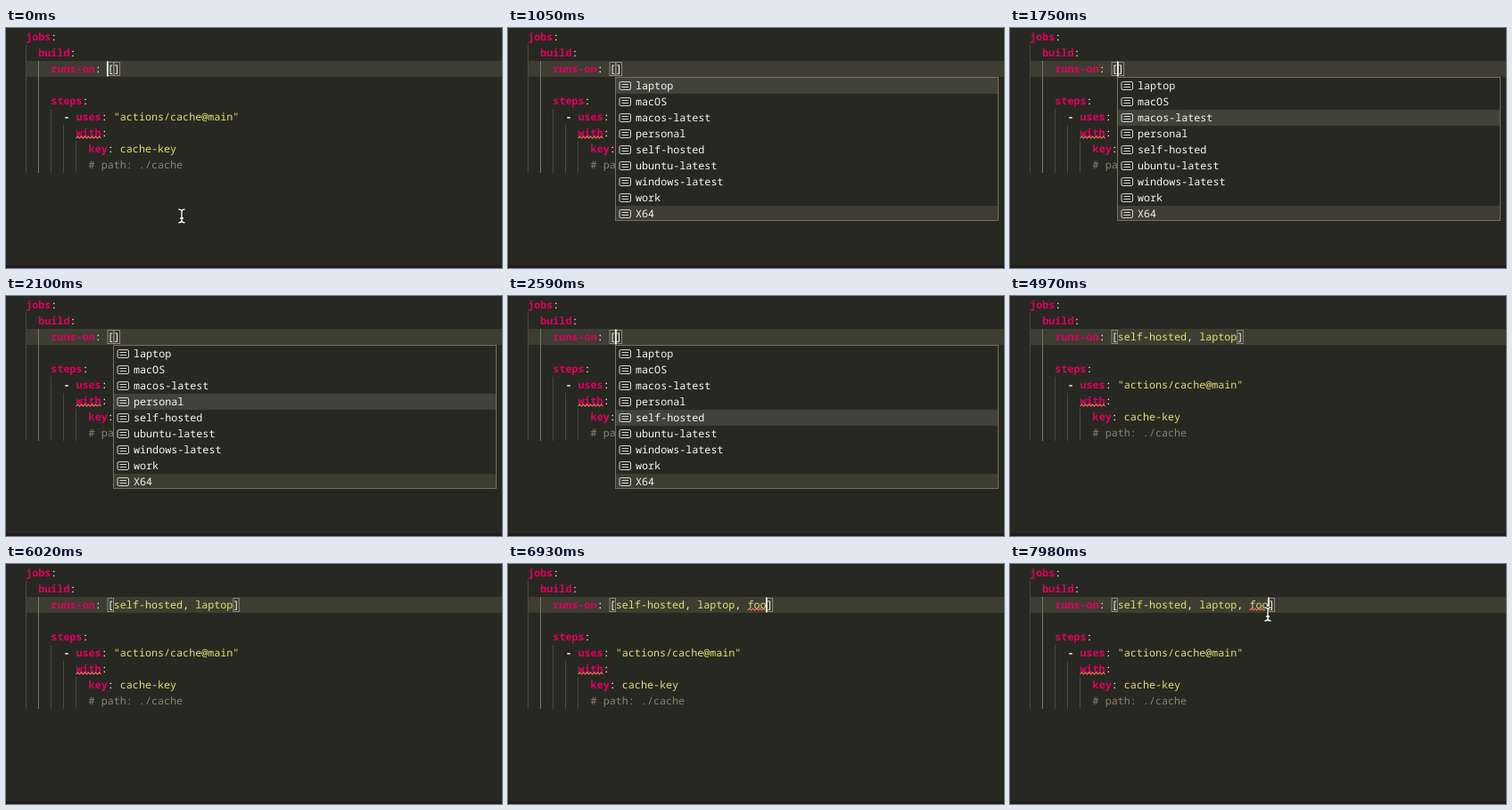
Write an HTML page that moves like this. It is 556 px wide and 270 px high and loops after 8 s.

```html
<!DOCTYPE html>
<html lang="en">
<head>
<meta charset="utf-8">
<title>Workflow runner completion</title>
<style>
html, body { margin: 0; width: 100%; height: 100%; overflow: hidden; background: #272822; }
svg { display: block; width: 100%; height: 100%; }
text {
  font: 500 11.73px "Noto Sans Mono", "DejaVu Sans Mono", monospace;
  text-rendering: geometricPrecision;
  white-space: pre;
  fill: #f8f8f2;
}
.key { fill: #e00060; font-weight: 700; }
.str { fill: #e8dc72; }
.note { fill: #88846f; }
.wave { fill: none; stroke: #f0705c; stroke-width: 1.1; }
.match { fill: none; stroke: #8a8a80; }
</style>
</head>
<body>
<svg id="stage" viewBox="0 0 556 270" preserveAspectRatio="xMinYMin meet"></svg>
<script>
const LOOP = 8000, CHAR = 7.04, LEFT = 22.2, ROW = 18;
const stage = document.getElementById('stage');
const col = c => LEFT + c * CHAR;

function add(parent, tag, attrs, label) {
  const el = document.createElementNS('http://www.w3.org/2000/svg', tag);
  set(el, attrs);
  if (label !== undefined) el.textContent = label;
  parent.appendChild(el);
  return el;
}
function set(el, attrs) {
  for (const k in attrs) el.setAttribute(k, attrs[k]);
}
function show(el, on) {
  el.style.display = on ? '' : 'none';
}
const box = (parent, x, y, width, height, fill) =>
  add(parent, 'rect', { x, y, width, height, fill });
const word = (line, c, label, cls = '') =>
  add(stage, 'text', { x: col(c), y: 14.2 + line * ROW, class: cls }, label);

function wave(c, line, count) {
  const y = 16 + line * ROW, end = col(c + count);
  let d = `M${col(c)} ${y}`, up = true;
  for (let x = col(c) + 2; x <= end; x += 2, up = !up) d += `L${x} ${up ? y - 2 : y}`;
  return add(stage, 'path', { d, class: 'wave' });
}

// Editor background, current line and indent guides
box(stage, 0, 0, 556, 270, '#272822');
box(stage, 0, 267, 556, 3, '#211b1c');
box(stage, 22, 37, 534, 18, '#3e3d32');
[[0, 19], [2, 37], [4, 91], [6, 109], [8, 127]].forEach(([c, y]) =>
  box(stage, Math.floor(col(c)), y, 1, 163 - y, c === 2 ? '#74756c' : '#484941'));

// Fixed code: line, column, key, value, value class
[
  [0, 0, 'jobs'],
  [1, 2, 'build'],
  [2, 4, 'runs-on'],
  [4, 4, 'steps'],
  [5, 8, 'uses', '"actions/cache@main"', 'str'],
  [6, 8, 'with'],
  [7, 10, 'key', 'cache-key', 'str']
].forEach(([line, c, key, value, cls]) => {
  word(line, c, key, 'key');
  word(line, c + key.length, ':');
  if (value) word(line, c + key.length + 2, value, cls);
});
word(5, 6, '-').style.fontWeight = 700;
word(8, 10, '# path: ./cache', 'note');
wave(8, 6, 4);

// Edited list
const bracket = () => add(stage, 'rect', { y: 38.5, width: 6.5, height: 15, class: 'match' });
const openBox = bracket(), closeBox = bracket();
set(openBox, { x: col(13) + .3 });
word(2, 13, '[');
const list = word(2, 14, '', 'str');
const close = word(2, 14, ']');
const fooWave = wave(35, 2, 3);
const caret = box(stage, 0, 37.5, 1.8, 17, '#f8f8f0');

// Suggestion popup
const labels = ['laptop', 'macOS', 'macos-latest', 'personal', 'self-hosted',
  'ubuntu-latest', 'windows-latest', 'work', 'X64'];

function popup(x, items, hover) {
  const g = add(stage, 'g', { transform: `translate(${x} 55)` });
  add(g, 'rect', { x: .5, y: .5, width: 429, height: items.length * ROW - 1,
    fill: '#272822', stroke: '#75715e' });
  if (hover) box(g, 1, 1 + (items.length - 1) * ROW, 428, ROW - 2, '#3e3d32');
  const focus = box(g, 1, 1, 428, ROW, '#414339');
  items.forEach((label, i) => {
    const y = i * ROW;
    add(g, 'rect', { x: 5, y: y + 5.5, width: 12.5, height: 9, rx: 1.5,
      fill: 'none', stroke: '#d4d4cf' });
    box(g, 7.5, y + 8, 7.5, 1, '#d4d4cf');
    box(g, 7.5, y + 11, 7.5, 1, '#d4d4cf');
    add(g, 'text', { x: 23, y: y + 14.2 }, label);
  });
  return { g, focus };
}
const first = popup(120, labels, true);
const second = popup(212, labels.filter(s => s !== 'self-hosted'), false);

// Mouse I-beam
const mouse = add(stage, 'g', {});
const beam = 'M-3.5 -7.5Q-.5 -7.5 0 -5.5Q.5 -7.5 3.5 -7.5M0 -5.5V5.5M-3.5 7.5Q-.5 7.5 0 5.5Q.5 7.5 3.5 7.5M-2 2.5H2';
[['#15150f', 3], ['#ffffff', 1.4]].forEach(([stroke, width]) =>
  add(mouse, 'path', { d: beam, fill: 'none', stroke, 'stroke-width': width }));

// Timelines: [start, value]
const typed = [[0, ''], [2870, 'self-hosted'], [3150, 'self-hosted,'], [3430, 'self-hosted, '],
  [4410, 'self-hosted, laptop'], [6300, 'self-hosted, laptop,'], [6440, 'self-hosted, laptop, '],
  [6650, 'self-hosted, laptop, f'], [6720, 'self-hosted, laptop, fo'], [6860, 'self-hosted, laptop, foo']];
const caretOn = [[0, 1], [980, 0], [1470, 1], [1960, 0], [2520, 1], [3920, 0], [4410, 1],
  [4970, 0], [5530, 1], [6020, 0], [6300, 1], [7350, 0], [7840, 1]];
const menu = [[0, 0], [840, 1], [2870, 0], [3640, 2], [4410, 0]];
const picked = [[0, 0], [1470, 1], [1750, 2], [2100, 3], [2520, 4]];

function at(table, t) {
  let value = table[0][1];
  for (const [start, v] of table) if (t >= start) value = v;
  return value;
}

function draw(t) {
  const text = at(typed, t), end = 14 + text.length;
  list.textContent = text;
  // separators are plain white
  if (text.includes(',')) {
    list.textContent = '';
    text.split(/(,)/).forEach(part => {
      const span = add(list, 'tspan', {}, part);
      if (part === ',') span.style.fill = '#f8f8f2';
    });
  }
  set(close, { x: col(end) });
  set(closeBox, { x: col(end) + .3 });
  set(caret, { x: col(t < 420 ? 13 : end) - .8 });
  show(caret, at(caretOn, t));
  show(fooWave, t >= 6930);

  const open = at(menu, t);
  show(first.g, open === 1);
  show(second.g, open === 2);
  set(first.focus, { y: 1 + at(picked, t) * ROW });

  show(mouse, t < 420 || t >= 7560);
  let x = 197, y = 211.5;
  if (t >= 7560) {
    const p = Math.min(1, Math.floor((t - 7560) / 70) / 6);
    const rest = (1 - p) ** 2;
    x = 289 + 24 * rest;
    y = 56.5 + 96 * rest;
  }
  set(mouse, { transform: `translate(${x} ${y})` });
}

const begin = performance.now();
function tick() {
  draw((performance.now() - begin) % LOOP);
  requestAnimationFrame(tick);
}
tick();
</script>
</body>
</html>
```
